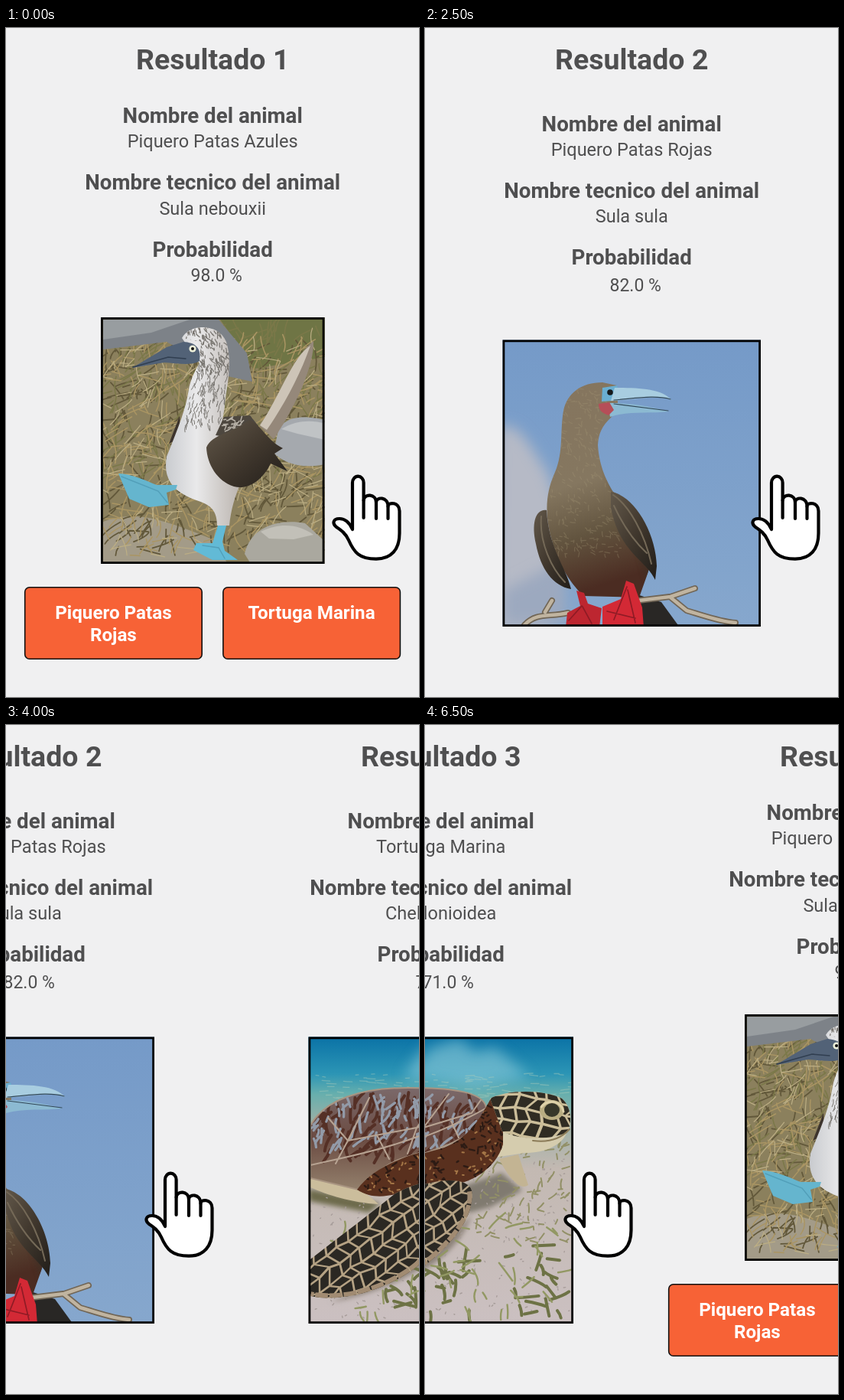
These frames come from a looping animation (540x874 px, 7.5 s). An HTML page:

```html
<!DOCTYPE html>
<html lang="es">
<head>
<meta charset="utf-8">
<title>Resultados</title>
<style>
  html, body { margin: 0; width: 100%; height: 100%; overflow: hidden; background: #f0f0f1; }
  #stage { display: block; width: 100%; height: 100%; }
  text { font-family: Roboto, sans-serif; text-anchor: middle; fill: #4f4f50; }
  .title { font-size: 37.5px; font-weight: 700; }
  .head { font-size: 27.7px; font-weight: 700; }
  .body { font-size: 23.55px; }
  .rate { font-size: 23px; }
  .button rect { fill: #f76236; stroke: #111; stroke-width: 1.6; }
  .button text { font-size: 24.2px; font-weight: 700; fill: #fff; }
  .frame { fill: none; stroke: #000; stroke-width: 2.8; }
  .lines { fill: none; stroke-linecap: round; }
</style>
</head>
<body>
<svg id="stage" viewBox="0 0 540 874">
  <defs>
    <linearGradient id="sky" x1="0" y1="0" x2="0" y2="1">
      <stop offset="0" stop-color="#759ac8"/><stop offset="1" stop-color="#86a7cd"/>
    </linearGradient>
    <linearGradient id="sea" x1="0" y1="0" x2="0" y2="1">
      <stop offset="0" stop-color="#0a72a6"/><stop offset=".13" stop-color="#2c95b5"/>
      <stop offset=".2" stop-color="#67afad"/><stop offset=".3" stop-color="#9cb0a6"/>
      <stop offset=".46" stop-color="#c3b9b2"/><stop offset="1" stop-color="#cbc0c1"/>
    </linearGradient>
    <linearGradient id="white" x1="0" x2="1">
      <stop offset="0" stop-color="#c9cbcf"/><stop offset=".4" stop-color="#e9e9ea"/><stop offset="1" stop-color="#b9b2ac"/>
    </linearGradient>
    <linearGradient id="plumage" x1="0" y1="0" x2=".15" y2="1">
      <stop offset="0" stop-color="#85755e"/><stop offset=".5" stop-color="#857760"/>
      <stop offset=".75" stop-color="#62543f"/><stop offset="1" stop-color="#4b2c22"/>
    </linearGradient>
    <linearGradient id="brown" x1="0" y1="0" x2="1" y2="1">
      <stop offset="0" stop-color="#62584a"/><stop offset=".5" stop-color="#41382e"/><stop offset="1" stop-color="#211d19"/>
    </linearGradient>
    <linearGradient id="shell" x1="0" y1="0" x2="0" y2="1">
      <stop offset="0" stop-color="#7b696a"/><stop offset=".5" stop-color="#6b4b42"/><stop offset="1" stop-color="#93806c"/>
    </linearGradient>
    <filter id="soft" x="-40%" y="-40%" width="180%" height="180%"><feGaussianBlur stdDeviation="9"/></filter>
    <filter id="slight" x="-10%" y="-10%" width="120%" height="120%"><feGaussianBlur stdDeviation="3"/></filter>
    <filter id="fine" x="-5%" y="-5%" width="110%" height="110%"><feGaussianBlur stdDeviation=".6"/></filter>
    <clipPath id="neckClip"><path d="M230 405C240 386 278 385 288 410C297 438 288 470 286 495L280 530L225 535C238 505 240 465 253 438L255 410Z"/></clipPath>
    <clipPath id="bodyClip"><path id="bodyShape" d="M181 500C186 477 204 463 232 463L251 467L252 490L244 508C231 520 227 530 226 545C228 575 239 594 246 606C277 620 302 672 292 710L280 744L207 742C188 723 172 697 165 666C155 630 160 604 168 585C182 556 176 528 181 500Z"/></clipPath>
    <clipPath id="shellClip"><path id="shellShape" d="M104 523C123 489 170 474 232 474C290 474 326 482 325 503C315 541 260 554 222 567C196 576 180 596 166 607L104 592Z"/></clipPath>
    <clipPath id="collarClip"><path id="collarShape" d="M165 607C185 580 221 565 260 555C301 545 318 512 331 488L347 505V548C337 582 300 602 271 601C237 600 200 630 165 607Z"/></clipPath>
    <clipPath id="headClip"><path id="headShape" d="M330 488C350 477 398 475 424 488C437 499 438 523 430 533C402 543 370 542 346 531Z"/></clipPath>
    <clipPath id="flipperClip"><path id="flipperShape" d="M306 608C311 645 276 682 240 710C201 739 145 755 104 746V698C139 671 180 640 215 612C255 590 302 590 306 608Z"/></clipPath>

    <g id="blueBooby">
      <rect x="124" y="378" width="293" height="322" fill="#8b805d"/>
      <path d="M278 378H417V430L325 445Z" fill="#6f7545"/>
      <path d="M127 645C170 628 212 645 270 668L290 700H127Z" fill="#a39b88"/>
      <g filter="url(#fine)">
        <path id="grassDark" class="lines" stroke="#62583a" stroke-width="1.8"/>
        <path id="grassGreen" class="lines" stroke="#7b7849" stroke-width="1.6"/>
        <path id="grassGold" class="lines" stroke="#aa9563" stroke-width="1.5"/>
        <path id="grassPale" class="lines" stroke="#bcae84" stroke-width="1.2"/>
      </g>
      <path d="M127 381H278L315 425L322 462L290 455L210 410L127 420Z" fill="#7d8288"/>
      <path d="M127 381H240L190 398L127 407Z" fill="#989da0"/>
      <path d="M355 530C361 507 387 505 417 512V570C385 577 361 567 350 555Z" fill="#a5a9ae"/>
      <path d="M360 524C380 512 400 512 417 517V538L381 530Z" fill="#c0c3c5"/>
      <path d="M312 687C320 650 359 641 391 647L414 668V700H320Z" fill="#aaa89f"/>
      <path d="M333 658C360 645 384 649 402 662L376 668L344 667Z" fill="#c2c0b8"/>
      <path d="M402 409C403 445 375 500 350 537L332 520C360 478 374 431 402 409Z" fill="#95887a"/>
      <path d="M398 415C384 455 362 495 341 525L332 519C360 478 374 430 398 415Z" fill="#cdc4b7"/>
      <path d="M227 507L213 543L229 535Z" fill="#3d342d"/>
      <path d="M230 405C240 386 278 385 288 410C297 438 288 470 286 495L280 530L309 590C299 611 294 630 292 650H276C276 628 265 622 249 617C219 606 205 590 210 560C222 530 235 500 239 472C242 455 253 438 253 438Z" fill="url(#white)"/>
      <g class="lines" clip-path="url(#neckClip)" stroke="#77746f">
        <path id="headFlecks" stroke-width="1.2"/>
        <path id="neckFlecks" stroke-width="1"/>
      </g>
      <path d="M274 532L285 508L319 506L330 520L302 537Z" fill="#4d473f"/>
      <path id="backFlecks" class="lines" stroke="#b8b2a8" stroke-width="1.5"/>
      <path d="M262 548C269 531 296 529 318 512C333 517 340 538 362 549L351 556L368 579L346 569C335 592 315 604 298 599C276 592 263 570 262 548Z" fill="url(#brown)"/>
      <path d="M165 444L210 417L232 410C247 411 256 417 253 435C242 442 224 438 207 437Z" fill="#526277"/>
      <path d="M166 443L212 430L235 432" class="lines" stroke="#303e50" stroke-width="1.5"/>
      <circle cx="244" cy="419" r="4.6" fill="#edf0da"/><circle cx="244" cy="419" r="2" fill="#111"/>
      <path d="M147 582C164 582 184 592 197 597L224 597L222 603L210 607L213 623L187 626L161 615Z" fill="#65b5ce"/>
      <path d="M277 650H288L283 671L286 683L303 695L270 695L245 682L249 673L270 673Z" fill="#62bad6"/>
      <path d="M151 586L199 605L211 620M257 676L278 679L286 693" class="lines" stroke="#529fb9" stroke-width="1.5"/>
    </g>

    <g id="redBooby">
      <rect x="101" y="407" width="339" height="376" fill="url(#sky)"/>
      <path d="M95 522C122 510 139 550 160 580L180 640L162 790H90Z" fill="#b6bac6" filter="url(#soft)"/>
      <path d="M180 695L185 780H102V735Z" fill="#9ca9bf" filter="url(#soft)"/>
      <path d="M277 740L309 750L333 783H284Z" fill="#292725"/>
      <use href="#bodyShape" fill="url(#plumage)"/>
      <g clip-path="url(#bodyClip)">
        <path d="M255 505C222 535 232 590 262 630L300 760L320 600Z" fill="#3d3226" opacity=".5" filter="url(#slight)"/>
        <path id="plumageFlecks" class="lines" stroke="#a69779" stroke-width="1.2" opacity=".3"/>
      </g>
      <path d="M159 630C144 628 139 648 145 674C151 706 167 729 191 733C184 703 162 681 159 630Z" fill="url(#brown)"/>
      <path d="M243 606C273 610 302 659 303 703L301 721C287 693 255 686 243 627Z" fill="url(#brown)"/>
      <path d="M246 610C267 624 287 660 296 700M247 624C259 650 275 672 290 686M152 638C149 672 166 707 183 724" class="lines" stroke="#746957" stroke-width="2"/>
      <path d="M232 470L251 467L257 486L231 488Z" fill="#6aaed1"/>
      <path d="M248 470C278 470 310 471 322 486C305 479 278 485 243 487Z" fill="#a8cde0"/>
      <path d="M239 490C268 489 301 496 319 501C293 504 266 500 242 508Z" fill="#8cbad2"/>
      <path d="M247 486C274 484 301 479 321 485M247 491L318 500" class="lines" stroke="#314757" stroke-width="1.2"/>
      <path d="M227 491L241 489L247 499L240 506C231 503 227 499 227 491Z" fill="#b54e58"/>
      <circle cx="242" cy="476" r="3.8" fill="#15191b"/>
      <g class="lines" stroke="#716656" stroke-width="8">
        <path id="branch" d="M130 780C146 763 162 770 187 764M166 748L157 763M279 748L320 743L342 761C362 767 387 776 406 777M321 743L353 732"/>
      </g>
      <use href="#branch" class="lines" stroke="#c0b4a0" stroke-width="4.5"/>
      <path d="M198 735L208 738L213 752L231 758L228 783H184L186 764L203 755Z" fill="#bd2630"/>
      <path d="M263 722L273 726L284 757L286 783H232V756L256 746Z" fill="#d32935"/>
      <path d="M205 755L188 774M206 756L218 778M264 730L247 773M265 734L275 777M238 762L275 771" class="lines" stroke="#8f1b25" stroke-width="1.7"/>
    </g>

    <g id="turtle">
      <rect x="101" y="407" width="339" height="376" fill="url(#sea)"/>
      <path d="M225 460L252 422L291 410L310 428L336 421L383 460L310 474Z" fill="#8ecbd9" opacity=".6" filter="url(#soft)"/>
      <path id="ripples" class="lines" stroke="#b1ccba" stroke-width="1.3" opacity=".4"/>
      <path d="M102 606L196 625L180 637L102 622Z" fill="#6d6a4b" filter="url(#slight)"/>
      <path d="M290 604L345 585L372 608L330 630L300 638Z" fill="#807a70" filter="url(#slight)"/>
      <path d="M306 640C290 690 230 735 130 754L240 705Z" fill="#8c8278" filter="url(#slight)"/>
      <g filter="url(#fine)">
        <path id="sand" class="lines" stroke="#a79d9a" stroke-width="1.4"/>
        <path id="weeds" class="lines" stroke="#929067" stroke-width="2"/>
        <path id="weedsDark" class="lines" stroke="#6d7245" stroke-width="4"/>
        <path id="weedsLight" class="lines" stroke="#929863" stroke-width="2.4"/>
      </g>
      <path d="M104 577C137 597 168 600 193 626C158 624 126 614 104 604Z" fill="#cbbd9c"/>
      <use href="#shellShape" fill="url(#shell)"/>
      <g clip-path="url(#shellClip)">
        <g filter="url(#fine)">
          <path id="shellRust" class="lines" stroke="#553026" stroke-width="4"/>
          <path id="shellStreaks" class="lines" stroke="#929aa8" stroke-width="3.2"/>
        </g>
        <path d="M104 575C155 563 235 551 324 501M127 513L153 543L137 573M153 543L181 487M153 543L243 526L276 482M243 526L231 560M243 526L306 507L318 490M191 536L207 567M278 515L289 539" class="lines" stroke="#b7a392" stroke-width="2"/>
      </g>
      <use href="#shellShape" fill="none" stroke="#a99582" stroke-width="2"/>
      <path d="M342 567L367 561L380 601C369 609 354 591 342 567Z" fill="#c3b493"/>
      <path d="M346 531C372 543 410 542 431 531C425 549 402 559 376 559L336 565Z" fill="#d5ccae"/>
      <use href="#collarShape" fill="#59301e"/>
      <g clip-path="url(#collarClip)">
        <path id="collarFlecks" class="lines" stroke="#a57747" stroke-width="2"/>
        <path id="collarDark" class="lines" stroke="#2d1b14" stroke-width="2.4"/>
      </g>
      <use href="#headShape" fill="#cbbd99"/>
      <path id="headScales" clip-path="url(#headClip)" fill="#302c23"/>
      <ellipse cx="411" cy="503" rx="16" ry="13" fill="#b9ad82"/><ellipse cx="411" cy="503" rx="10" ry="9" fill="#37372a"/>
      <path d="M397 499C408 487 423 492 426 505" class="lines" stroke="#ded2aa" stroke-width="3"/>
      <path d="M386 543C407 546 423 540 434 528" class="lines" stroke="#8b7b58" stroke-width="2"/>
      <use href="#flipperShape" fill="#b5a284"/>
      <path id="flipperScales" clip-path="url(#flipperClip)" fill="#2b2823"/>
      <path d="M306 609C311 645 276 682 240 710C201 739 145 755 104 746" fill="none" stroke="#a18b72" stroke-width="12" stroke-dasharray="17 2" clip-path="url(#flipperClip)"/>
    </g>
  </defs>

  <g id="pages"></g>
  <g id="hand" fill="#fff" stroke="#000" stroke-width="4.2" stroke-linecap="round" stroke-linejoin="round">
    <path d="M453 655V594a7.3 8.3 0 0 1 14.6 0V617C468 608 484 608 484 620C484 612 499.5 612 499.5 625C499.5 619 514.5 619 514.5 631V660C514.5 681 504 693.7 484 693.7C462 693.7 455 685 448 669C444 660 438 656 432 652C426 647 428 641 436 641C444 641 449 646 453 655Z"/>
    <path d="M467.6 617V640M484 620V641M499.5 625V641" fill="none"/>
  </g>
</svg>
<script>
const $ = id => document.getElementById(id);

let seed = 7;
function random() {
  seed = (seed * 16807) % 2147483647;
  return seed / 2147483647;
}
const spread = amount => (random() - 0.5) * amount;

// Scatters short curved strokes over the box [x, y, width, height].
function scatter(id, count, [x, y, w, h], length, angle, variation) {
  let d = '';
  for (let i = 0; i < count; i++) {
    const a = angle + spread(variation), size = length * (0.4 + random());
    const dx = Math.cos(a) * size, dy = Math.sin(a) * size;
    d += `M${x + random() * w} ${y + random() * h}q${dx / 2 + spread(size / 2)} ${dy / 2} ${dx} ${dy}`;
  }
  $(id).setAttribute('d', d);
}

// Fills a tilted box with irregular scales; fill is the part of its cell each one covers.
function scales(id, [cx, cy, w, h], size, tilt, fill) {
  const nodes = new Map();
  const corner = (col, row) => {
    const key = `${col},${row}`;
    if (!nodes.has(key)) {
      const x = (col + (row % 2) / 2) * size - w / 2 + spread(size * 0.45);
      const y = row * size * 0.9 - h / 2 + spread(size * 0.4);
      nodes.set(key, [cx + x * Math.cos(tilt) - y * Math.sin(tilt), cy + x * Math.sin(tilt) + y * Math.cos(tilt)]);
    }
    return nodes.get(key);
  };
  let d = '';
  for (let row = 0; row * size * 0.9 < h; row++) {
    for (let col = 0; col * size < w; col++) {
      const points = [corner(col, row), corner(col + 1, row), corner(col + 1, row + 1), corner(col, row + 1)];
      const middle = [0, 1].map(k => points.reduce((sum, p) => sum + p[k], 0) / 4);
      d += 'M' + points.map(p => p.map((v, k) => middle[k] + (v - middle[k]) * fill).join(' ')).join('L') + 'Z';
    }
  }
  $(id).setAttribute('d', d);
}

const meadow = [120, 420, 300, 270];
scatter('grassDark', 330, meadow, 22, -1, 2.6);
scatter('grassGreen', 230, [120, 395, 300, 200], 26, -1.2, 2);
scatter('grassGold', 370, meadow, 25, -0.8, 2.6);
scatter('grassPale', 200, meadow, 23, -0.7, 2.6);
scatter('headFlecks', 190, [235, 388, 58, 62], 5, 1.2, 1.2);
scatter('neckFlecks', 170, [230, 435, 62, 85], 7, 1.7, 0.8);
scatter('backFlecks', 28, [282, 510, 30, 18], 6, -0.4, 2);
scatter('plumageFlecks', 330, [160, 470, 95, 220], 5, 0.8, 2);
scatter('ripples', 90, [104, 455, 330, 35], 9, 0, 0.4);
scatter('sand', 260, [104, 555, 332, 220], 2, 0, 6);
scatter('weeds', 100, [310, 550, 120, 125], 9, -0.5, 2.5);
scatter('weedsDark', 42, [190, 680, 230, 90], 22, 0.6, 2.8);
scatter('weedsLight', 50, [130, 640, 290, 130], 21, 0.4, 2.6);
scatter('shellStreaks', 80, [104, 480, 210, 70], 15, 1.9, 1.4);
scatter('shellRust', 100, [115, 480, 205, 80], 18, 1.9, 1.4);
scatter('collarFlecks', 150, [165, 490, 180, 120], 3, 0.6, 3);
scatter('collarDark', 170, [165, 490, 180, 120], 5, 0.6, 3);
scales('headScales', [378, 506, 110, 70], 18, 0.15, 0.8);
scales('flipperScales', [207, 671, 260, 120], 17, -0.63, 0.82);

const results = [
  { name: 'Piquero Patas Azules', species: 'Sula nebouxii', rate: '98.0 %', art: 'blueBooby',
    box: [124, 378, 292.5, 322], lines: [124, 156, 211, 244, 299, 331], related: [['Piquero Patas', 'Rojas'], ['Tortuga Marina']] },
  { name: 'Piquero Patas Rojas', species: 'Sula sula', rate: '82.0 %', art: 'redBooby' },
  { name: 'Tortuga Marina', species: 'Chelonioidea', rate: '71.0 %', art: 'turtle' }
];

const text = (kind, y, content, x = 270.2) => `<text class="${kind}" x="${x}" y="${y}">${content}</text>`;

function button(words, i) {
  const x = 24.7 + i * 259.2;
  return `<g class="button"><rect x="${x}" y="730.7" width="231.5" height="93.5" rx="6"/>` +
    words.map((word, row) => text('', 772 + row * 29, word, x + 115.7)).join('') + '</g>';
}

function page({ name, species, rate, art, box = [101.5, 407.5, 337.5, 374.5], lines = [135, 167, 222, 254, 309, 344], related = [] }, i) {
  const [x, y, w, h] = box;
  return `<g>${text('title', 54, `Resultado ${i + 1}`)}
    ${text('head', lines[0], 'Nombre del animal')}${text('body', lines[1], name)}
    ${text('head', lines[2], 'Nombre tecnico del animal')}${text('body', lines[3], species)}
    ${text('head', lines[4], 'Probabilidad')}${text('rate', lines[5], rate, 275.2)}
    <svg x="${x}" y="${y}" width="${w}" height="${h}" viewBox="${box.join(' ')}"><use href="#${art}"/></svg>
    <rect class="frame" x="${x + 1.4}" y="${y + 1.4}" width="${w - 2.8}" height="${h - 2.8}"/>
    ${related.map(button).join('')}</g>`;
}

$('pages').innerHTML = results.map(page).join('');
const pages = [...$('pages').children];

// Each result rests for 1.5 s, then is held half swiped for 1 s.
function draw() {
  const time = performance.now() % 7500;
  const current = Math.floor(time / 2500);
  const swiped = time % 2500 >= 1500;
  const shift = swiped ? -245 : 0;
  pages.forEach((group, i) => {
    const isNext = swiped && i === (current + 1) % 3;
    group.setAttribute('display', i === current || isNext ? 'inline' : 'none');
    group.setAttribute('transform', `translate(${isNext ? 294 : shift})`);
  });
  $('hand').setAttribute('transform', `translate(${shift})`);
  requestAnimationFrame(draw);
}
draw();
</script>
</body>
</html>
```
